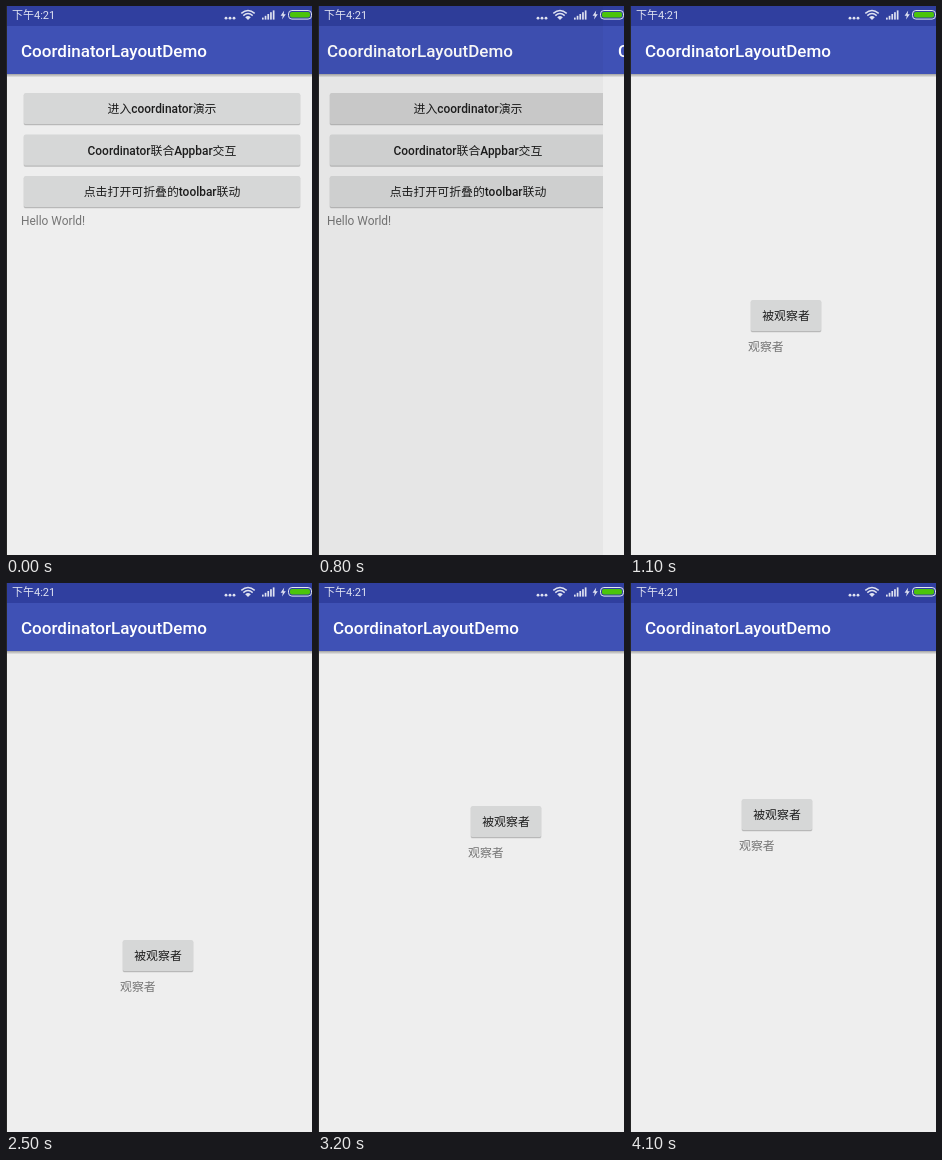
Recreate the animation shown at these times as an HTML page. Size 306 px wide and 549 px high, loop 5.4 s.

```html
<!DOCTYPE html>
<html lang="zh-CN">
<head>
<meta charset="utf-8">
<style>
html, body { margin: 0; width: 100%; height: 100%; overflow: hidden; background: #eee; }
svg { display: block; width: 306px; height: 549px; }
text { font: 11.9px Roboto, "Noto Sans CJK SC", "Noto Sans CJK", sans-serif; fill: #757575; white-space: pre; }
.title { font-size: 17px; font-weight: 500; fill: #fff; }
.caption { font-weight: 500; fill: #1c1c1c; text-anchor: middle; }
.clock { font-size: 11px; fill: #dfe2f1; }
</style>
</head>
<body>
<svg id="stage" viewBox="0 0 306 549">
  <defs>
    <linearGradient id="fade" x2="0" y2="1">
      <stop stop-color="#000" stop-opacity=".32"/>
      <stop offset="1" stop-color="#000" stop-opacity="0"/>
    </linearGradient>
  </defs>
  <g id="menu"></g>
  <rect id="dim" width="306" height="549"/>
  <g id="detail"></g>
  <g id="status" fill="#dfe2f1">
    <text class="clock" x="6" y="13">下午4:21</text>
    <circle cx="220" cy="12.2" r="1.4"/>
    <circle cx="224" cy="12.2" r="1.4"/>
    <circle cx="228" cy="12.2" r="1.4"/>
    <g fill="none" stroke="#dfe2f1" stroke-width="1.4">
      <path d="M235.3 7.4Q242 1.6 248.7 7.4M237.3 9.6Q242 5.6 246.7 9.6"/>
    </g>
    <path d="M239.2 11.2Q242 8.9 244.8 11.2L242 14Z"/>
    <g id="bars"></g>
    <path d="M278.2 4.6L274.6 9.7H276.8L276 13.4L279.8 8.2H277.6Z"/>
    <rect x="282.5" y="4.5" width="23" height="8.6" rx="3.4" fill="none" stroke="#e4e7f2"/>
    <rect x="284" y="6" width="20" height="5.6" rx="2" fill="#4bc40b"/>
  </g>
  <rect width="1" height="549" fill="#262626"/>
</svg>
<script>
const LOOP = 5400, STEP = 100;
const $ = id => document.getElementById(id);

const button = (x, y, w, label, id = "") => `
  <rect x="${x - .5}" y="${y + .6}" width="${w + 1}" height="32" rx="2" fill="#000" opacity=".1"/>
  <rect x="${x}" y="${y + 1}" width="${w}" height="31" rx="1.5" fill="#000" opacity=".14"/>
  <rect id="${id}" x="${x}" y="${y}" width="${w}" height="31" rx="1.5" fill="#d6d7d7"/>
  <text class="caption" x="${x + w / 2}" y="${y + 20.4}">${label}</text>`;

const page = content => `
  <rect width="306" height="549" fill="#eee"/>
  <rect y="68" width="306" height="3.5" fill="url(#fade)"/>
  <rect width="306" height="20" fill="#303f9f"/>
  <rect y="20" width="306" height="48" fill="#3f51b5"/>
  <text class="title" x="15" y="50.7">CoordinatorLayoutDemo</text>
  ${content}`;

$("menu").innerHTML = page(
  button(18, 87, 276, "进入coordinator演示", "entry") +
  button(18, 128.4, 276, "Coordinator联合Appbar交互") +
  button(18, 170, 276, "点击打开可折叠的toolbar联动") +
  `<text x="15" y="219">Hello World!</text>`);

$("detail").innerHTML = page(`<g id="pair">
  ${button(0, 0, 70, "被观察者")}
  <text x="-3" y="51">观察者</text></g>`);

$("bars").innerHTML = [0, 1, 2, 3, 4].map(i => {
  const h = 2 + i * 1.8;
  return `<rect x="${256 + i * 2.7}" y="${13.6 - h}" width="1.7" height="${h}"/>`;
}).join("");

// Button position for each step of the drag, starting at DRAG.
const DRAG = 2500, REST = [121, 294];
const drag = [
  [117, 357], [95, 339], [79, 299], [83, 253], [106, 217], [137, 205],
  [147, 210], [153, 223], [153, 245], [146, 268], [130, 290], [107, 303],
  [93, 293], [90, 270], [92, 247], [100, 229], [112, 216]
];

// Share of the page slide done, for each step from SLIDE.
const SLIDE = 800;
const slide = [.07, .66, .93, 1];

const stepAt = (list, start, t, before) => {
  const i = Math.floor((t - start) / STEP);
  return i < 0 ? before : list[Math.min(i, list.length - 1)];
};
const move = (id, x, y = 0) => $(id).setAttribute("transform", `translate(${x} ${y})`);

function draw(t) {
  const p = stepAt(slide, SLIDE, t, 0);
  move("menu", -Math.round(p * 82));
  move("detail", Math.round(306 * (1 - p)));
  move("pair", ...stepAt(drag, DRAG, t, REST));
  $("dim").setAttribute("opacity", p * .5);
  $("entry").setAttribute("fill", stepAt(["#d2d2d2", "#cfcfcf"], 500, t, "#d6d7d7"));
}

const start = performance.now();
function tick() {
  draw((performance.now() - start) % LOOP);
  requestAnimationFrame(tick);
}
tick();
</script>
</body>
</html>
```
